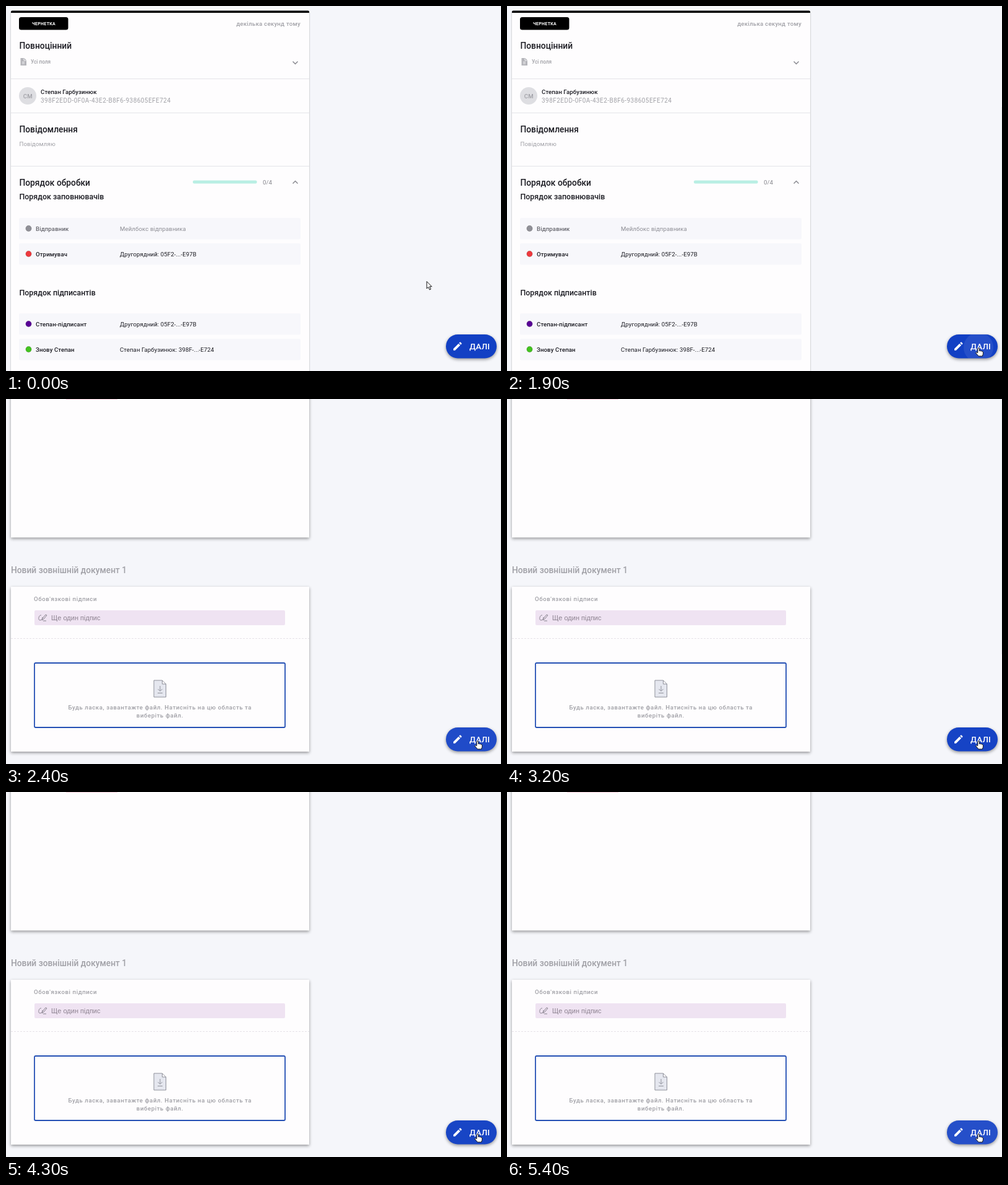
An HTML page that plays this animation: 800 px wide and 589 px high, repeating every 5.5 s.

```html
<!DOCTYPE html>
<html lang="uk">
<head>
<meta charset="utf-8">
<style>
  html, body { margin: 0; width: 100%; height: 100%; overflow: hidden; background: #f5f6fa; }
  svg { display: block; width: 800px; height: 589px; }
  text { font: 9.63px Roboto, sans-serif; letter-spacing: .1px; fill: #1b1b22; white-space: pre; }
  .h { font-size: 13.75px; font-weight: 500; letter-spacing: 0; }
  .sub { font-size: 12.4px; font-weight: 500; letter-spacing: 0; }
  .b { font-weight: 500; }
  .body { font-size: 11px; }
  .hint { font-weight: 500; letter-spacing: .57px; }
  .sign { font: 11px "Liberation Sans", Arial, sans-serif; letter-spacing: 0; fill: #8d8290; }
  .g { fill: #a0a0a6; }
  .mid { text-anchor: middle; }
  .card { fill: #fefdfe; filter: drop-shadow(0 1px 1px #0005); }
  .doc { fill: #fefdfe; filter: drop-shadow(0 2px 2.5px #0006); }
  .line { stroke: #e4e4e9; }
  .dash { stroke: #e6e2e8; stroke-dasharray: 3 2; }
  .chev { fill: none; stroke: #85858c; stroke-width: 1.4; }
  .input { fill: #fff; stroke: #dedee3; }
  #fab { filter: drop-shadow(0 2px 2.5px #0006); }
</style>
</head>
<body>
<svg viewBox="0 0 800 589">
  <defs>
    <clipPath id="pill"><rect x="711" y="530" width="82" height="38.5" rx="19.2"/></clipPath>
    <g id="band">
      <rect x="46" y="341" width="405" height="24" rx="2" fill="#efe3f2"/>
      <path d="M57 349c-4-1-6 8-2 8 3 0 4-3 4-5M58 357l1-3 5-6 2 1-5 6zM60 358l5 0" fill="none" stroke="#85808c"/>
    </g>
  </defs>

  <g id="page">
    <rect class="card" x="8" y="8" width="482" height="659" rx="2"/>
    <path d="M8 11v-1.500a2 2 0 0 1 2-2h478a2 2 0 0 1 2 2v1.500z"/>
    <rect x="21" y="18" width="79.500" height="20.500" rx="3.500"/>
    <text class="mid" x="61" y="30.500" style="font-size:7px;font-weight:700;letter-spacing:.3px;fill:#fff">ЧЕРНЕТКА</text>
    <text class="b g" x="476" y="32" text-anchor="end" style="letter-spacing:.25px">декілька секунд тому</text>
    <text class="h" x="21.500" y="69">Повноцінний</text>
    <path d="M23.500 84h6l3.500 3.500v8.500h-9.500z" fill="#b5b5ba"/>
    <path d="M29 84.500v3.500h3.500M26 90.500h4M26 93h4" fill="none" stroke="#f6f6f8"/>
    <text class="b g" x="40" y="93" style="font-size:8.25px;letter-spacing:0">Усі поля</text>
    <path class="chev" d="M463.500 89.500l4 4 4-4"/>

    <path class="line" d="M8 117.500h482M8 172.500h482M8 258.500h482M8 592.500h482"/>
    <circle cx="35" cy="145" r="14" fill="#dedee2"/>
    <text class="b g mid" x="35.300" y="148.500">СМ</text>
    <text class="b" x="56" y="142">Степан Гарбузинюк</text>
    <text class="g" x="56" y="156" style="font-size:10px;letter-spacing:.45px">398F2EDD-0F0A-43E2-B8F6-938605EFE724</text>

    <text class="h" x="21.500" y="203.500">Повідомлення</text>
    <text class="g" x="21.500" y="225.500">Повідомляю</text>

    <text class="h" x="21.500" y="289.500">Порядок обробки</text>
    <rect x="302" y="281.500" width="103.500" height="5" rx="2" fill="#b9efe4"/>
    <text x="415" y="288" style="fill:#85858c">0/4</text>
    <path class="chev" d="M463.500 286.500l4-4 4 4"/>
    <text class="sub" x="21.500" y="312">Порядок заповнювачів</text>
    <text class="sub" x="21.500" y="467">Порядок підписантів</text>
    <g id="rows"></g>

    <text class="body" x="21.500" y="622">Строк дії конверту закінчиться через</text>
    <rect class="input" x="220.500" y="609.500" width="33" height="17" rx="2"/>
    <text class="body" x="228" y="622">30</text>
    <text class="body" x="260" y="622">днів. Сповістити користувачів за</text>
    <rect class="input" x="437.500" y="609.500" width="34" height="17" rx="2"/>
    <text class="body" x="445.500" y="622">1</text>
    <text class="body" x="21.500" y="642.500">днів до закінчення строку дії.</text>

    <text class="h g" x="8" y="724.500">Універсальний</text>
    <rect class="doc" x="8" y="745.500" width="482" height="871"/>
    <text class="hint g" x="45" y="769">Обов'язкові підписи</text>
    <use href="#band" y="443"/>
    <text class="sign" x="73" y="800">Підпис</text>
    <path class="dash" d="M8 829.500h482"/>
    <rect x="97" y="1380" width="83" height="14" fill="#f8d3df"/>

    <g transform="translate(0 1393)">
      <text class="h g" x="8" y="281">Новий зовнішній документ 1</text>
      <rect class="doc" x="8" y="303" width="482" height="266"/>
      <text class="hint g" x="45" y="325.500">Обов'язкові підписи</text>
      <use href="#band"/>
      <text class="sign" x="73" y="357">Ще один підпис</text>
      <path class="dash" d="M8 386.500h482"/>
      <rect x="46" y="426" width="405" height="104" rx="2" fill="#fefdfe" stroke="#2450b4" stroke-width="1.800"/>
      <path d="M239 454h13.500l6 6v21h-19.500zM252.500 454v6h6" fill="#e5e7ef" stroke="#8f919b"/>
      <path d="M249 463v8M245.500 468l3.500 3.500 3.500-3.500M245 474.500h8" fill="none" stroke="#8f919b"/>
      <text class="hint g mid" x="248.800" y="501">Будь ласка, завантажте файл. Натисніть на цю область та</text>
      <text class="hint g mid" x="248.800" y="514">виберіть файл.</text>
    </g>
  </g>

  <rect x="799" width="1" height="589" fill="#e9eaef"/>
  <rect id="thumb" x="799" width="1" height="176" fill="#f7f8fb"/>

  <rect id="fab" x="711" y="530" width="82" height="38.500" rx="19.200" fill="#1240c4"/>
  <circle id="ripple" cx="762" cy="551" fill="#fff" clip-path="url(#pill)"/>
  <path transform="translate(720.800 540) scale(.75)" fill="#fff" d="M3 17.250V21h3.750L17.810 9.940l-3.750-3.750zM20.710 7.040a1 1 0 0 0 0-1.410l-2.340-2.340a1 1 0 0 0-1.410 0l-1.830 1.830 3.750 3.750z"/>
  <text class="b" x="749" y="554" style="font-size:13.4px;fill:#fff">ДАЛІ</text>

  <g id="cursor" stroke="#111" stroke-linejoin="round">
    <path id="arrow" fill="#fff" d="M0 0v11.500l2.600-2.400 2 4.300 2-.9-2-4.200h3.600z"/>
    <path id="hand" fill="#fff" d="M-1.200 7.500V1a1.200 1.200 0 0 1 2.500 0v3.500q1.200-.8 2.200.3 1.200-.6 2 .5 1.700-.3 1.900 1.400v3L6.300 13H.2L-4.500 7.800q1-1.800 3.300-.3z"/>
  </g>
</svg>
<script>
const $ = id => document.getElementById(id);
const SCROLL = 1393;

const rows = [
  [342, '#909097', 'Відправник', 'Мейлбокс відправника'],
  [383, '#ee393e', 'Отримувач', 'Другорядний: 05F2-...-E97B'],
  [496, '#590096', 'Степан-підписант', 'Другорядний: 05F2-...-E97B'],
  [537, '#42c31f', 'Знову Степан', 'Степан Гарбузинюк: 398F-...-E724'],
];
$('rows').innerHTML = rows.map(([y, color, role, who], i) => `
  <rect x="21" y="${y}" width="455" height="34.500" rx="2" fill="#f7f7fb"/>
  <circle cx="36.500" cy="${y + 17}" r="4.700" fill="${color}" stroke="#0003" stroke-width=".8"/>
  <text class="b" x="48" y="${y + 20.5}" ${i ? '' : 'style="fill:#66666d"'}>${role}</text>
  <text x="184" y="${y + 20.5}" ${i ? '' : 'style="fill:#8e8e95"'}>${who}</text>`).join('');

// Cosine ease between two times, clamped to 0..1
const ease = (t, from, to) =>
  (1 - Math.cos(Math.PI * Math.min(1, Math.max(0, (t - from) / (to - from))))) / 2;

function draw(t) {
  const scroll = SCROLL * ease(t, 2000, 2400);
  $('page').setAttribute('transform', `translate(0 ${-scroll})`);
  $('thumb').setAttribute('y', -13 + scroll * .305);

  const move = ease(t, 0, 600);
  const over = move > .85;
  $('cursor').setAttribute('transform', `translate(${680 + 82 * move} ${444.5 + 107.5 * move})`);
  $('arrow').style.display = over ? 'none' : '';
  $('hand').style.display = over ? '' : 'none';

  // The press spreads over the button, then pulses while focused
  const pulse = (1 + Math.cos(2 * Math.PI * (t - 2130) / 1640)) / 2;
  $('ripple').setAttribute('r', t < 1800 ? 0 : Math.min(60, (t - 1750) * .16));
  $('ripple').setAttribute('opacity', .08 * (t < 2100 ? 1 : pulse));
}

function tick() {
  draw(Math.floor(performance.now() % 5500 / 100) * 100);
  requestAnimationFrame(tick);
}
tick();
</script>
</body>
</html>
```
